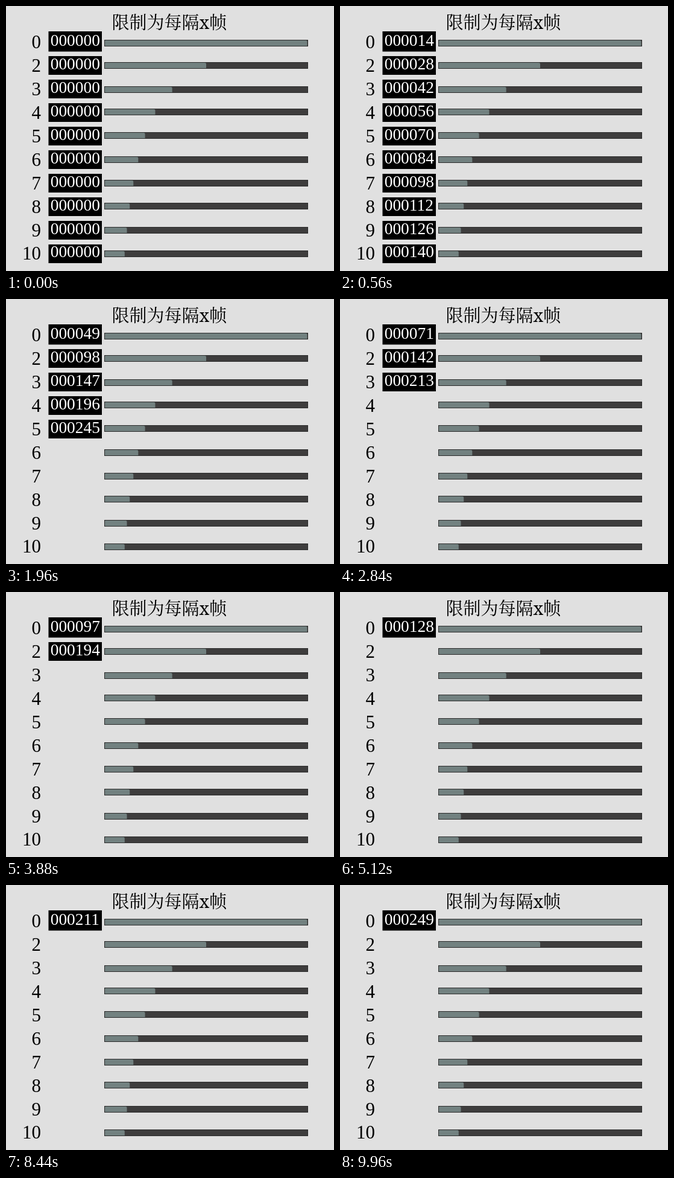
Animation, 544 px wide and 439 px high, one loop 10000 ms. Source, as an HTML page with a canvas:

```html
<!DOCTYPE html>
<html lang="zh-CN">
<head>
<meta charset="utf-8">
<style>
html, body { margin: 0; width: 100%; height: 100%; overflow: hidden; background: #e0e0e0; }
canvas { display: block; }
</style>
</head>
<body>
<canvas id="stage" width="544" height="439"></canvas>
<script>
const ctx = document.getElementById('stage').getContext('2d');
const TICK = 40, TICKS = 250, PITCH = 38.9;
const DIGITS = '"Liberation Serif", serif';
const TITLE = '"Noto Serif", "Noto Serif CJK SC", "Noto Sans CJK SC", "Noto Sans CJK", serif';
const BAR_TOPS = [56, 93, 133, 170, 209, 249, 288, 326, 366, 405];

function text(str, x, y, size, family, color, align = 'left') {
  ctx.font = `${size}px ${family}`;
  ctx.textAlign = align;
  ctx.fillStyle = color;
  ctx.fillText(str, x, y);
}

function rect(x, y, w, h, color) {
  ctx.fillStyle = color;
  ctx.fillRect(x, y, w, h);
}

function drawBar(y, step) {
  rect(163, y, 338, 11, '#2c2c2c');
  rect(164, y + 1, 336, 9, '#3e3d3d');
  const right = step === 1 ? 499.5 : 163 + 338 / step;
  ctx.fillStyle = '#728180';
  ctx.beginPath();
  ctx.roundRect(164, y + 1, right - 164, 9, [1, 2, 0, 0]);
  ctx.fill();
}

function drawCounter(row, value) {
  const top = row ? Math.round(83.3 + PITCH * (row - 1)) : 42;
  rect(70.5, top, 88.5, row ? 31 : 33.5, '#000');
  text(String(value).padStart(6, '0'), 73.7, Math.round(66.3 + PITCH * row), 27.4, DIGITS, '#fff');
}

function draw(tick) {
  rect(0, 0, 544, 439, '#e0e0e0');
  text('限制为每隔x帧', 175.5, 38, 29, TITLE, '#000');
  BAR_TOPS.forEach((y, row) => {
    const step = row + 1;
    const value = tick * step;
    text(row ? step : 0, 58, Math.round(70.3 + PITCH * row), 31, DIGITS, '#000', 'right');
    drawBar(y, step);
    if (value < TICKS) drawCounter(row, value);
  });
}

function loop() {
  draw(Math.floor(performance.now() / TICK) % TICKS);
  requestAnimationFrame(loop);
}
loop();
</script>
</body>
</html>
```
